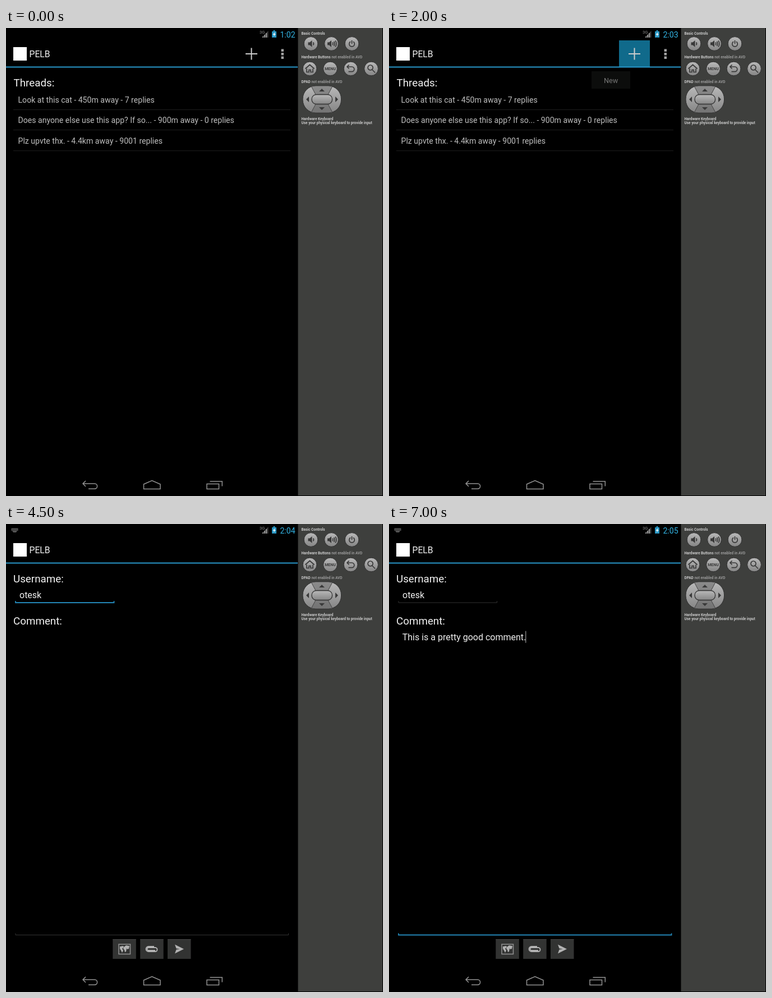
Animation, 672 px wide and 833 px high, one loop 8000 ms. Source, as an HTML page:

```html
<!DOCTYPE html>
<html lang="en">
<head>
<meta charset="utf-8">
<title>Threads app</title>
<style>
  html, body { margin: 0; height: 100%; overflow: hidden; background: #000; }
  svg { display: block; width: 100%; height: 100%; font-family: Roboto, sans-serif; }
  .line { fill: none; stroke: #929292; stroke-width: 1.5; }
  .heading { font-size: 18.8px; fill: #f3f3f3; }
  .row { font-size: 14.1px; fill: #bebebe; }
  .field { font-size: 16px; fill: #f0f0f0; }
  .underline { fill: none; stroke: #333; stroke-width: 1; }
  .underline.focus { stroke: #2385b5; stroke-width: 1.8; }
  .panel { font-size: 6.45px; font-weight: bold; fill: #c9c9c9; }
  .dim { fill: #999; }
  .glyph { fill: none; stroke: #393939; stroke-width: 1.7; }
  .solid { fill: #393939; }
</style>
</head>
<body>
<svg viewBox="0 0 672 833">
  <defs>
    <linearGradient id="metal" x2="0" y2="1">
      <stop stop-color="#b9b9b9"/><stop offset="1" stop-color="#858585"/>
    </linearGradient>
    <g id="key"><circle r="12.4" fill="url(#metal)" stroke="#2d2d2d"/></g>
    <g id="tool">
      <path fill="#323332" d="M0 0h41.5v35H0z"/>
      <path stroke="#484848" d="M0 .5h41.5"/>
    </g>
    <path id="speaker" class="solid" d="M-5-2.5h3l4-3.5v12l-4-3.5h-3z"/>
  </defs>

  <!-- Status bar -->
  <text x="452" y="10" font-size="7.6" fill="#8d8d8d">3G</text>
  <path fill="#3c3c3c" d="M456 17 467.5 5v12z"/>
  <path stroke="#9b9b9b" stroke-width="1.8" d="M458 17v-2M461 17v-5M464 17v-8"/>
  <path fill="#2795c2" d="M474 6h2.5V4h3v2h2.5v11h-8z"/>
  <path fill="#fff" d="m479.5 7-4 5h2.3l-1 3.5 4-5h-2.3z"/>
  <text id="clock" x="488.5" y="16.7" font-size="14" fill="#33b5e5"></text>

  <!-- Action bar -->
  <rect id="pressed" x="410" y="22" width="55" height="47" fill="#106a8b"/>
  <path fill="#2898cb" d="M0 68.4h520v2H0z"/>
  <rect x="13" y="34" width="24" height="24" fill="#fff"/>
  <text x="41.5" y="52" font-size="15.7" fill="#f3f3f3">PELB</text>

  <g id="list">
    <path stroke="#cdcdcd" stroke-width="2" d="M427 46h21M437.5 35.5v21"/>
    <path fill="#a0a0a0" d="M490.5 37.5h4.5v4.5h-4.5zM490.5 44h4.5v4.5h-4.5zM490.5 50.5h4.5V55h-4.5z"/>
    <text class="heading" x="13.5" y="104">Threads:</text>
    <text class="row" x="21.5" y="133">Look at this cat - 450m away - 7 replies</text>
    <text class="row" x="21.5" y="169.3">Does anyone else use this app? If so... - 900m away - 0 replies</text>
    <text class="row" x="21.5" y="205.7">Plz upvte thx. - 4.4km away - 9001 replies</text>
    <path stroke="#1d1d1d" d="M13 145.5h494M13 181.5h494M13 218.5h494"/>
  </g>
  <g id="hint">
    <path fill="#0c0d0c" d="M361 77h69v31h-69z"/>
    <text x="383" y="98" font-size="12.7" fill="#777">New</text>
  </g>

  <g id="form">
    <path fill="#555" d="M9.5 7.5h12v4.5h-1.5l-2 3h-5l-2-3H9.5z"/>
    <path stroke="#111" stroke-dasharray="1 1" d="M11 9.5h9M11 11.5h9"/>
    <text class="heading" x="13" y="104">Username:</text>
    <text class="field" x="24" y="132.3">otesk</text>
    <path id="nameLine" class="underline" d="M17 137v3h175.5v-3"/>
    <text class="heading" x="13" y="179">Comment:</text>
    <path id="commentLine" class="underline" d="M17 728.5v3h486.5v-3"/>
    <use href="#tool" x="190.3" y="739"/>
    <use href="#tool" x="239.2" y="739"/>
    <use href="#tool" x="288" y="739"/>
    <rect class="line" x="201" y="748" width="20.5" height="17.5"/>
    <path fill="#b2b2b2" d="m203 752 6-1 1 2-3 3 2 3-2 4-2-4-2-3zM210 753l4-3 6 1-1 5-3 1-1-2-1 6-2 1-1-4-2-2z"/>
    <path class="line" style="stroke:#b2b2b2;stroke-width:1.8" d="M266 759h-12a2.4 2.4 0 0 1 0-5h13a3.7 3.7 0 0 1 0 7h-13a4.5 4.5 0 0 1 0-9h10"/>
    <path fill="#b2b2b2" d="m301 748.5 16 8-16 8 2.5-7 6-1-6-1z"/>
  </g>
  <g id="comment">
    <text class="field" x="23.7" y="207">This is a pretty good comment.</text>
    <path stroke="#bbb" d="M243.8 190.5v21"/>
  </g>

  <!-- Navigation bar -->
  <g class="line">
    <path d="m142 806-5 5 5 5M137 811h21a4.6 4.6 0 0 1 0 9.2h-11"/>
    <path d="M245.5 820.5v-8.5l14.7-6.5 14.8 6.5v8.5z"/>
    <path d="M358 811.5h21.5v9H358zM363.5 807h21.8v8.5"/>
  </g>

  <!-- Emulator controls -->
  <path fill="#3e3f3d" d="M520.5 0H671v832H520.5z"/>
  <g class="panel">
    <text x="526.5" y="11.5">Basic Controls</text>
    <text x="526.5" y="53.8">Hardware Buttons <tspan class="dim">not enabled in AVD</tspan></text>
    <text x="526.5" y="98">DPAD <tspan class="dim">not enabled in AVD</tspan></text>
    <text x="526.5" y="164">Hardware Keyboard</text>
    <text x="526.5" y="171.3">Use your physical keyboard to provide input</text>
  </g>
  <g transform="translate(543.5 28)"><use href="#key"/><use href="#speaker"/><path class="glyph" d="M4-2.5q2 2.5 0 5"/></g>
  <g transform="translate(580 28)"><use href="#key"/><use href="#speaker" x="-2"/><path class="glyph" d="M2-2.5q2 2.5 0 5M4.5-4q3 4 0 8M7-5.5q4 5.5 0 11"/></g>
  <g transform="translate(616.5 28)"><use href="#key"/><path class="glyph" d="M-2.5-3.7a4.8 4.8 0 1 0 5 0M0-6V0"/></g>
  <g transform="translate(541.5 72.5)"><use href="#key"/><path class="glyph" d="m-8 0 8-7 8 7M-5.5 0v6h4V2h3v4h4V0"/></g>
  <g transform="translate(578 72.5)"><use href="#key"/><text class="solid" y="2.5" font-size="7" font-weight="bold" text-anchor="middle">MENU</text></g>
  <g transform="translate(614.5 72.5)"><use href="#key"/><path class="glyph" d="m-3-7-3.5 3.5L-3 0M-6-3.5h8a4.3 4.3 0 0 1 0 8.6h-6"/></g>
  <g transform="translate(651 72.5)"><use href="#key"/><path class="glyph" d="M2 2 7 7M3-2a4.5 4.5 0 1 1-9 0 4.5 4.5 0 1 1 9 0"/></g>
  <g transform="translate(563 127)">
    <rect x="-34" y="-24" width="68.5" height="48" rx="23" fill="url(#metal)" stroke="#2d2d2d"/>
    <path fill="#666" opacity=".55" d="M-19-23.5-11-8H11L19-23.5zM-19 23.5-11 8H11L19 23.5z"/>
    <path stroke="#444" d="m-19-23.5 8 15M19-23.5l-8 15M-19 23.5l8-15M19 23.5l-8-15"/>
    <rect x="-18" y="-8.5" width="36.5" height="17" rx="8" fill="url(#metal)" stroke="#333" stroke-width="1.3"/>
    <path class="solid" d="m-5-14 5-5 5 5zM-5 14l5 5 5-5zM-23-5l-5 5 5 5zM24-5l5 5-5 5z"/>
  </g>
</svg>
<script>
  const starts = [0, 500, 3000, 5500];
  const clocks = ["1:02", "2:03", "2:04", "2:05"];
  const el = id => document.getElementById(id);
  const show = (id, on) => el(id).style.display = on ? "" : "none";

  function draw(now) {
    const time = now % 8000;
    const step = starts.filter(start => start <= time).length - 1;
    el("clock").textContent = clocks[step];
    show("list", step < 2);
    show("pressed", step === 1);
    show("hint", step === 1);
    show("form", step > 1);
    show("comment", step === 3);
    el("nameLine").classList.toggle("focus", step === 2);
    el("commentLine").classList.toggle("focus", step === 3);
    requestAnimationFrame(draw);
  }
  draw(0);
</script>
</body>
</html>
```
